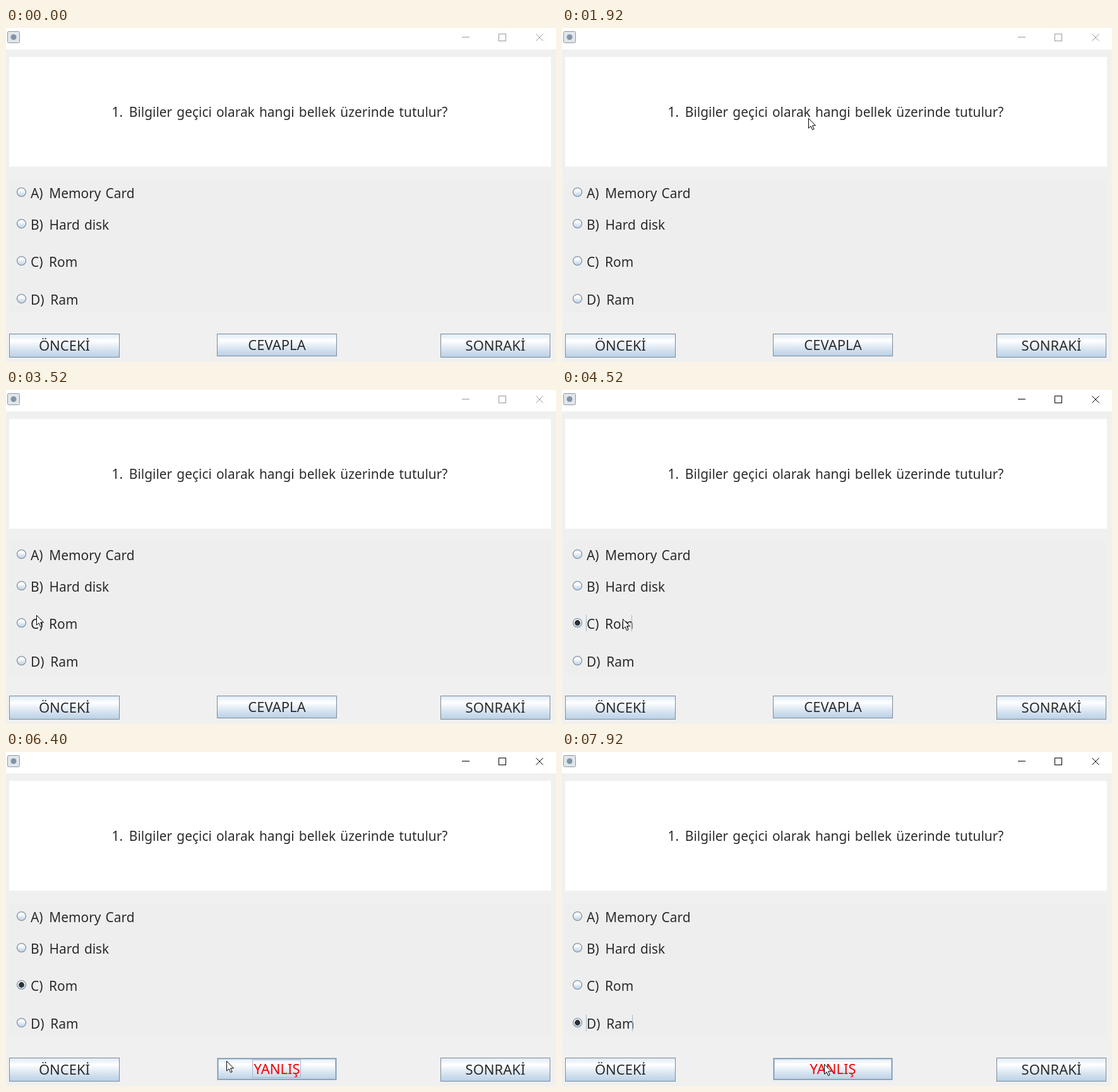
An HTML page for the animation above (8 s loop, 871 px wide and 530 px high).

```html
<!DOCTYPE html>
<html lang="tr">
<head>
<meta charset="utf-8">
<title>Quiz</title>
<style>
  html, body { margin: 0; width: 100%; height: 100%; overflow: hidden; background: #f0f0f0; }
  svg { display: block; width: 871px; height: 530px; }
  text { font: 20.9px "Noto Sans", "Open Sans", sans-serif; word-spacing: 1.7px; fill: #2b2b2b; }
  .label { font-size: 22px; text-anchor: middle; }
  .line { fill: none; stroke-width: 1; }
  .crisp { shape-rendering: crispEdges; }
</style>
</head>
<body>
<svg id="stage" viewBox="0 0 871 530">
  <defs>
    <linearGradient id="ocean" x2="0" y2="1">
      <stop offset="0" stop-color="#dde8f3"/>
      <stop offset=".3" stop-color="#fff"/>
      <stop offset=".6" stop-color="#dde8f3"/>
      <stop offset="1" stop-color="#b8cfe5"/>
    </linearGradient>
  </defs>
  <rect width="871" height="530" fill="#f0f0f0"/>
  <rect width="871" height="34" fill="#fff"/>
  <rect x="2.5" y="5.5" width="19" height="18" rx="2" fill="#e1e6ea" stroke="#8f989f"/>
  <circle cx="12" cy="14.5" r="4.5" fill="#8195a8"/>
  <g id="chrome" class="line">
    <path class="crisp" d="M722 14.5h12M780.5 9.5h11v11h-11z"/>
    <path d="M839.5 9.5l11 11m0-11l-11 11"/>
  </g>
  <rect x="5" y="46" width="858" height="174" fill="#fff"/>
  <rect x="5" y="240" width="858" height="212" fill="#eee"/>
  <text x="433.5" y="141" text-anchor="middle">1.<tspan dx="2.5"> Bilgiler geçici olarak hangi bellek üzerinde tutulur?</tspan></text>
</svg>
<script>
const LOOP = 8000, STEP = 40;
const stage = document.getElementById('stage');
const chrome = document.getElementById('chrome');

function add(tag, attrs, text = '', parent = stage) {
  const el = document.createElementNS('http://www.w3.org/2000/svg', tag);
  for (const key in attrs) el.setAttribute(key, attrs[key]);
  el.textContent = text;
  return parent.appendChild(el);
}
const show = (el, on) => el.setAttribute('visibility', on ? 'visible' : 'hidden');
const fill = (el, pressed) => el.setAttribute('fill', pressed ? '#b8cfe5' : 'url(#ocean)');

function frame(x, y, w, h, color) {
  return add('rect', { x: x + .5, y: y + .5, width: w - 1, height: h - 1, stroke: color, class: 'line crisp' });
}

function makeButton(name, x, y, w, h) {
  const face = add('rect', { x, y, width: w, height: h });
  const edge = frame(x, y, w, h, '#7a8a99');
  const glow = [0, 1, 2].map(i =>
    frame(x + i, y + i, w - 2 * i, h - 2 * i, i === 1 ? '#7a8a99' : '#b8cfe5'));
  const label = add('text', { x: x + w / 2, y: y + h / 2 + 8, class: 'label' }, name);
  function draw(px, py, pressed) {
    const lit = !pressed && px >= x && px < x + w && py >= y && py < y + h;
    fill(face, pressed);
    show(edge, !lit);
    glow.forEach(g => show(g, lit));
  }
  return { label, draw };
}

function makeOption(letter, name, y) {
  const ring = add('circle', { cx: 24.5, cy: y, r: 7, stroke: '#7a8a99', 'stroke-width': 1.2 });
  const dot = add('circle', { cx: 24.5, cy: y, r: 4.4, fill: '#2b2f36' });
  const label = add('text', { x: 39, y: y + 9.5 }, letter + ')');
  add('tspan', { dx: 2.5 }, ' ' + name, label);
  const end = Math.floor(39 + label.getComputedTextLength()) + .5;
  const focus = add('path', {
    d: `M38.5 ${y - 12.5}v26M${end} ${y - 12.5}v26`, stroke: '#a3b8cc', class: 'line crisp'
  });
  return function draw(picked, focused, pressed) {
    fill(ring, pressed);
    show(dot, picked);
    show(focus, focused);
  };
}

const optA = makeOption('A', 'Memory Card', 260.5);
const optB = makeOption('B', 'Hard disk', 310.5);
const optC = makeOption('C', 'Rom', 369.5);
const optD = makeOption('D', 'Ram', 429.5);
const back = makeButton('ÖNCEKİ', 5, 485, 175, 38);
const answer = makeButton('CEVAPLA', 334, 485, 190, 36);
const next = makeButton('SONRAKİ', 688, 485, 174, 38);
const answerFocus = frame(390, 488, 77, 29, '#a3b8cc');

const cursor = add('path', {
  d: 'M.5.5v15.6l3.6-3.4 2.5 5.8 2.5-1.1-2.5-5.6h4.9z',
  fill: '#fff', stroke: '#000', 'stroke-width': 1
});

// the pointer eases from stop to stop
const stops = [
  { t: 600, x: 790, y: 502 },
  { t: 1060, x: 20, y: 262 },
  { t: 1400, x: 204, y: 146 },
  { t: 1920, x: 390, y: 143 },
  { t: 2360, x: 623, y: 146 },
  { t: 3240, x: 20, y: 357 },
  { t: 3520, x: 48, y: 357 },
  { t: 4100, x: 96, y: 363 },
  { t: 4520, x: 96, y: 363 },
  { t: 5160, x: 410, y: 497 },
  { t: 5920, x: 410, y: 497 },
  { t: 6400, x: 349, y: 490 },
  { t: 6720, x: 24, y: 426 },
  { t: 7120, x: 24, y: 426 },
  { t: 7920, x: 415, y: 495 }
];

function tip(t) {
  const i = stops.findIndex(s => s.t > t);
  if (i === 0) return { x: -100, y: -100 };
  const b = stops.at(i), a = i < 0 ? b : stops[i - 1];
  const f = a === b ? 1 : (1 - Math.cos(Math.PI * (t - a.t) / (b.t - a.t))) / 2;
  const mix = (p, q) => Math.round(p + (q - p) * f);
  return { x: mix(a.x, b.x), y: mix(a.y, b.y) };
}

// mouse presses; each is released HOLD ms later
const PICK_C = 4160, SUBMIT = 5280, PICK_D = 6920, HOLD = 80;

function draw(time) {
  const t = Math.floor(time % LOOP / STEP) * STEP;
  const within = (a, b) => t >= a && t < b;
  const held = press => within(press, press + HOLD);
  const { x, y } = tip(t);
  cursor.setAttribute('transform', `translate(${x} ${y})`);
  chrome.setAttribute('stroke', t < PICK_C ? '#999' : '#000');

  optA(false, false, false);
  optB(false, false, false);
  optC(within(PICK_C + HOLD, PICK_D + HOLD), within(PICK_C, SUBMIT), held(PICK_C));
  optD(t >= PICK_D + HOLD, t >= PICK_D, held(PICK_D));

  back.draw(x, y, false);
  answer.draw(x, y, held(SUBMIT));
  next.draw(x, y, false);
  const wrong = t >= SUBMIT + HOLD;
  answer.label.textContent = wrong ? 'YANLIŞ' : 'CEVAPLA';
  answer.label.style.fill = wrong ? '#f00000' : '';
  show(answerFocus, wrong && t < PICK_D);
}

const start = performance.now();
function tick() {
  draw(performance.now() - start);
  requestAnimationFrame(tick);
}
tick();
</script>
</body>
</html>
```
